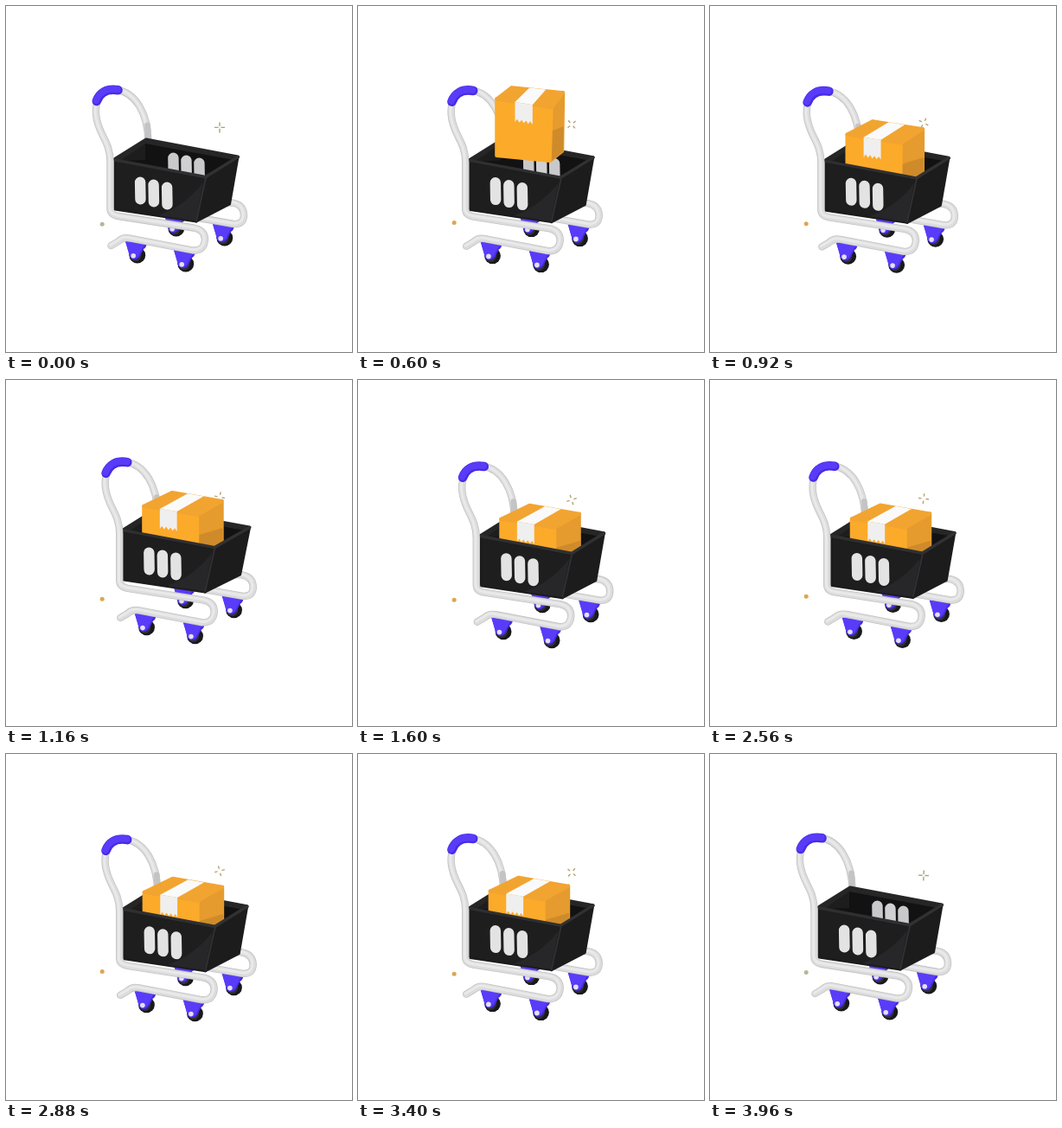
Recreate the animation shown at these times as an HTML page. Size 400 by 400 pixels, loop 4 s.

```html
<!DOCTYPE html>
<html lang="en">
<head>
<meta charset="utf-8">
<title>Shopping cart</title>
<style>
html, body { margin: 0; width: 100%; height: 100%; overflow: hidden; background: #fff; }
svg { display: block; width: 100vw; height: 100vh; }
</style>
</head>
<body>
<svg id="stage" viewBox="0 0 400 400"></svg>
<script>
const LOOP = 4000, TAU = Math.PI * 2;
const stage = document.getElementById('stage');

const line = (d, color, width, extra = '') =>
  `<path d="${d}" fill="none" stroke="${color}" stroke-width="${width}" stroke-linecap="round" stroke-linejoin="round" ${extra}/>`;
const tube = d => line(d, '#c3c3c5', 8.4) + line(d, '#dcdcdd', 6.8) +
  line(d, '#e9e9ea', 3, 'transform="translate(-.8 -.8)"');
const pill = (x, y, h, color) =>
  `<rect x="${x - 6.2}" y="${y}" width="12.4" height="${h}" rx="6.2" fill="${color}" transform="rotate(-1 ${x} ${y})"/>`;
const wheel = (x, y) => `<g transform="translate(${x} ${y})">
  <ellipse cx=".8" cy=".2" rx="9.4" ry="9.3" fill="#19191b"/>
  <ellipse cx="-1" cy="0" rx="6.6" ry="7.4" fill="#303033"/>
  <path d="M-13 -16 L11.5 -13 Q11.5 -9 8 -7 L4 1 Q1 6 -4 5 Q-8 4 -9 -2 Z" fill="#472be4"/>
  <path d="M-13 -16 L9.5 -13 L5 -5 L2 1 Q-1 5 -5 4 Q-8 3 -9 -3 Z" fill="#583cf9"/>
  <circle cx="-3.8" cy=".8" r="2.8" fill="#e3e1f2"/></g>`;
const shape = (id, color, round = 0) =>
  `<path id="${id}" fill="${color}" stroke="${color}" stroke-width="${round}" stroke-linejoin="round"/>`;

const grip = 'M104.8 110 C108 101 116 95 129.5 97.3';
stage.innerHTML = `
<g id="star"></g>
<circle id="dot" cx="111.2" r="2.5"/>
<g id="cart">
  ${tube('M127 96.5 C150 100 164 124 164.5 157')}
  ${line('M163.6 138 L164.5 157', '#c4c4c6', 7)}
  ${wheel(196, 257)}${wheel(252, 268)}
  ${tube('M244 227 L262 227.5 Q275 230 275 242 Q274.5 253 263 252 L200 241')}
  <g id="basket">
    ${shape('back', '#262627', 4)}
    ${shape('inLeft', '#1d1d1e')}
    ${shape('inBack', '#121213')}
    ${pill(193.3, 169.5, 32, '#c9c9cb')}${pill(208.3, 172.5, 32, '#d0d0d2')}${pill(223.3, 175.5, 32, '#c9c9cb')}
    <g id="box">
      ${shape('boxSide', '#e59b2d', 4)}
      ${shape('boxShade', '#cf8b2a', 2)}
      ${shape('boxFront', '#fcaa2a', 4)}
      ${shape('boxTop', '#f2a431', 4)}
      ${shape('tapeTop', '#fafafa')}
      ${shape('tapeFront', '#efefef')}
    </g>
    ${shape('right', '#1c1c1d', 3)}
    <path d="M126 179 L231 199 L220 249 L126 235 Z" fill="#1e1e1f" stroke="#1c1c1d" stroke-width="3" stroke-linejoin="round"/>
    <path d="M228 204 L219 248 L176 242 Q206 232 228 204 Z" fill="#272729"/>
    ${line('M231 199 L220 248', '#303032', 2)}
    ${line('M126 178 L230 197.5', '#2f2f31', 3.4)}
    <path id="rim" fill="none" stroke="#313133" stroke-width="3.4" stroke-linecap="round"/>
    ${pill(155, 197.5, 32, '#e3e3e4')}${pill(170.5, 200.5, 32, '#e3e3e4')}${pill(186, 203.5, 32, '#e3e3e4')}
  </g>
  ${wheel(151, 288)}${wheel(207, 298)}
  ${tube('M124 96.5 C109 98 103 110 104 125 C106 149 120.5 155 120.5 180 V234 Q120.5 241.5 130 243 L217 256.5 Q230 259 230 270 Q229 283.5 216 282.5 L143 268.5 Q135 267 130 272 L121.5 277')}
  ${line(grip, '#472be4', 10.6)}
  ${line(grip, '#583cf9', 7.6, 'transform="translate(-.6 -.8)"')}
</g>`;

const el = {};
stage.querySelectorAll('[id]').forEach(n => el[n.id] = n);

const clamp = v => Math.max(0, Math.min(1, v));
const phase = (t, a, b) => clamp((t - a) / (b - a));
const mix = (p, q, k) => p.map((v, i) => v + (q[i] - v) * k);
const poly = pts => 'M' + pts.map(p => p[0].toFixed(2) + ' ' + p[1].toFixed(2)).join('L') + 'Z';
const set = (id, pts) => el[id].setAttribute('d', poly(pts));

// back left, back right, front right, front left, then the three lower corners
const hover = [[174, 93.5], [233.5, 99.5], [220, 117], [156.5, 107], [156.5, 172.5], [218, 178.5], [232.5, 167]];
const rest = [[182, 142], [239.5, 152], [211, 168], [149, 158], [149, 212], [211, 222], [239.5, 206]];

function drawBox(t, hop) {
  const fall = phase(t, 610, 960) ** 2;
  const lift = 8.5 * hop;
  const grow = 1 - (1 - phase(t, 120, 540)) ** 3;
  const size = grow * (1 - phase(t, 3440, 3860) ** 2);
  el.box.style.display = size > 0.01 ? '' : 'none';
  const v = hover.map((p, i) => {
    const [x, y] = mix(p, rest[i], fall);
    return [x, y - lift];
  });
  const [bl, br, fr, fl, flb, frb, brb] = v;
  set('boxTop', [bl, br, fr, fl]);
  set('boxFront', [fl, fr, frb, flb]);
  set('boxSide', [fr, br, brb, frb]);
  set('boxShade', [mix(fr, frb, 0.46), mix(br, brb, 0.6), brb, frb]);
  const a = 0.335 - 0.035 * fall, b = a + 0.32;
  const left = mix(fl, fr, a), right = mix(fl, fr, b);
  const top = p => [p[0] + 0.6, p[1] - 1.6];
  set('tapeTop', [top(mix(bl, br, a)), top(mix(bl, br, b)), right, left]);
  const teeth = [];
  for (let i = 8; i >= 0; i--) {
    const p = mix(left, right, i / 8);
    teeth.push([p[0], p[1] + (i % 2 ? 19.5 : 23)]);
  }
  set('tapeFront', [left, right, ...teeth]);
  const cx = 195, cy = 138 + 42 * fall;
  el.box.setAttribute('transform', `translate(${cx} ${cy}) scale(${size}) translate(${-cx} ${-cy})`);
}

function drawBasket(flex) {
  const corner = [268 + 3.5 * flex, 174.5];
  const low = [258.5 + 2 * flex, 229];
  set('back', [[126, 177], [162, 154.5], corner, [231, 197]]);
  set('inLeft', [[132, 179], [161, 159], [161, 190]]);
  set('inBack', [[161, 159], [corner[0] - 5, corner[1] + 3.5], [231, 195], [132, 179], [161, 178]]);
  set('right', [[231, 199], corner, low, [220, 249]]);
  el.rim.setAttribute('d', `M231 197.5 L${corner[0]} ${corner[1]}`);
  el.basket.setAttribute('transform', `translate(${-0.6 * flex} ${-2 * flex})`);
}

function drawSpark(t, warm) {
  const w = TAU * t / 2000;
  const gap = 1.4 + 1.1 * phase(t, 300, 600) * (1 - phase(t, 3600, 3960));
  const y = 137.7 + 2.7 * Math.cos(w);
  let rays = '';
  for (let i = 0; i < 4; i++) {
    rays += `<path d="M${gap} 0H6" transform="rotate(${i * 90})"/>`;
  }
  el.star.innerHTML = rays;
  el.star.setAttribute('stroke', warm ? '#b5a473' : '#a5a37c');
  el.star.setAttribute('stroke-width', 1.4);
  el.star.setAttribute('transform', `translate(247 ${y}) rotate(${-270 * t / LOOP})`);
  el.dot.setAttribute('cy', 252.3 - 2 * Math.sin(w));
  el.dot.setAttribute('fill', warm ? '#dda552' : '#b9b594');
}

function render(t) {
  const swing = 1 - Math.cos(TAU * t / LOOP);
  const hop = Math.sin(Math.PI * phase(t, 980, 1440));
  el.cart.setAttribute('transform', `translate(${9 * swing - 0.5 * hop} ${1.5 * swing - 4.3 * hop})`);
  drawBasket(hop);
  drawBox(t, hop);
  drawSpark(t, t > 160 && t < 3840);
}

const start = performance.now();
function tick() {
  render((performance.now() - start) % LOOP);
  requestAnimationFrame(tick);
}
render(0);
requestAnimationFrame(tick);
</script>
</body>
</html>
```
